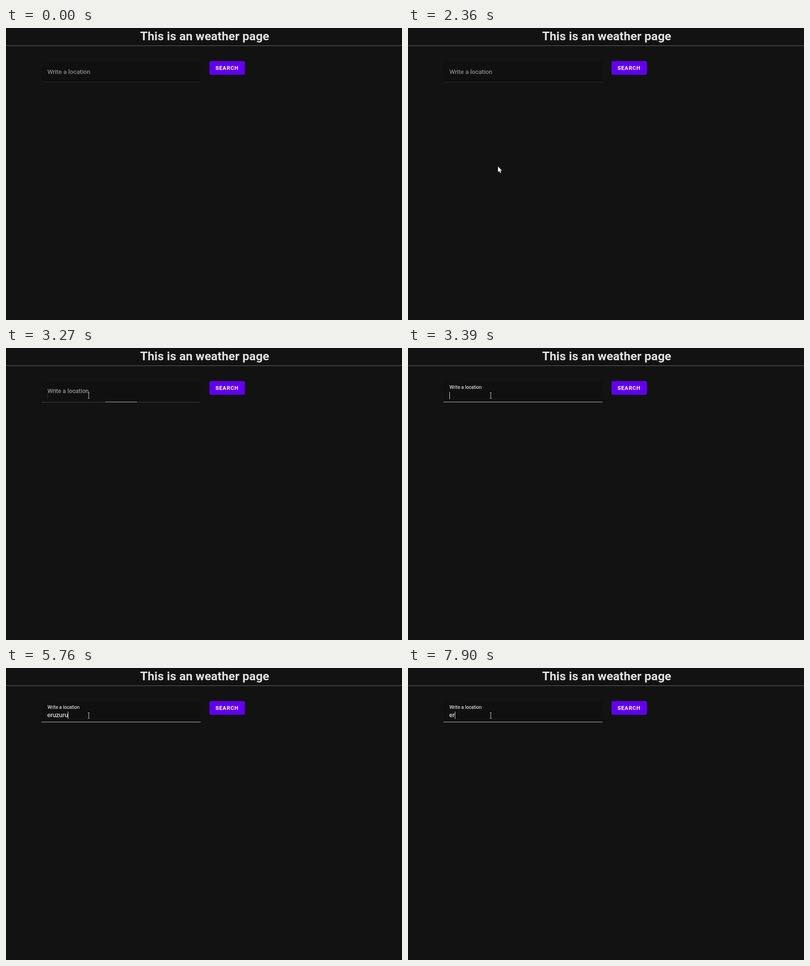
Animation, 871 px wide and 643 px high, one loop 8000 ms. Source, as an HTML page:

```html
<!DOCTYPE html>
<html lang="en">
<head>
<meta charset="utf-8">
<title>Weather page</title>
<style>
  html, body { margin: 0; width: 100%; height: 100%; overflow: hidden; background: #121212; }
  svg { display: block; width: 871px; height: 643px; font-family: Roboto, Arial, sans-serif; }
  .body { font-size: 13.333px; letter-spacing: .00937em; stroke-width: .3; }
  .button { font-size: 11.667px; font-weight: 500; letter-spacing: .0893em; fill: #fff; stroke: #fff; stroke-width: .35; }
  .raised { fill: #6200ee; filter: drop-shadow(0 1.5px 1.5px rgba(0, 0, 0, .35)); }
</style>
</head>
<body>
<svg viewBox="0 0 871 643">
  <rect width="871" height="643" fill="#121212"/>
  <text x="437" y="27" text-anchor="middle" font-size="26.667" font-weight="700" fill="#e0e0e0">This is an weather page</text>
  <rect y="38.2" width="871" height="1.5" fill="#505050"/>

  <path d="M78 119V75.8a3.3 3.3 0 0 1 3.3-3.3H424.7a3.3 3.3 0 0 1 3.3 3.3V119Z" fill="#101010"/>
  <rect id="underline" x="78" y="118.7" width="350" height="1"/>
  <rect id="ripple" y="118" height="1.7" fill="#767676"/>
  <text id="label" class="body">Write a location</text>
  <text id="typed" class="body" x="90.8" y="108.3" fill="#e0e0e0" stroke="#e0e0e0"></text>
  <rect id="caret" width="1" height="16" fill="#e0e0e0"/>

  <rect class="raised" x="447.5" y="73" width="78" height="30" rx="3.3"/>
  <text class="button" x="460.9" y="92.1">SEARCH</text>

  <path id="arrow" d="M0 0V12.4L2.8 9.8 4.7 14 6.7 13.1 4.9 9H8.6Z" fill="#fff"/>
  <path id="beam" d="M180 98.5h1.5l.5 .5 .5-.5H184M182 99V110.5M180 111h1.5l.5-.5 .5 .5H184" fill="none" stroke="#d0d0d0"/>
</svg>
<script>
const LOOP = 8000;
const POINTER_STEP = 70;
const BLINK = 530;
const HOVER = 3190, FOCUS = 3180;
const TYPE = 4040, TYPE_GAP = 172;
const LAST_KEY = 5760;
const ERASE = 6710, ERASE_GAP = 155;
const WORD = 'eruzuru';
const TEXT_X = 90.8;

const el = id => document.getElementById(id);
const set = (id, attrs) => {
  for (const name in attrs) el(id).setAttribute(name, attrs[name]);
};
const clamp = (v, lo, hi) => Math.min(hi, Math.max(lo, v));
const mix = (a, b, p) => a + (b - a) * p;
const gray = v => `rgb(${v},${v},${v})`;

function ease(t, start, length) {
  const p = clamp((t - start) / length, 0, 1);
  return p * p * (3 - 2 * p);
}

// Repeated casteljau mixing gives a point on a curve of any degree.
function curve(points, p) {
  if (points.length === 1) return points[0];
  const inner = points.slice(1).map(([x, y], i) =>
    [mix(points[i][0], x, p), mix(points[i][1], y, p)]);
  return curve(inner, p);
}

const moves = [
  { from: 1300, to: 1500, path: [[464, 596], [24, 529]], span: 140 },
  { from: 2360, to: 2770, path: [[198, 305], [365, 240], [295, 160], [181, 145]], span: 410 },
  { from: 2770, to: 3120, path: [[181, 145], [173, 140], [174, 128], [180, 112]], span: 350 }
];

function pointerAt(t) {
  const move = moves.find(m => t >= m.from && t < m.to);
  if (!move) return null;
  const elapsed = Math.floor((t - move.from) / POINTER_STEP) * POINTER_STEP;
  return curve(move.path, elapsed / move.span);
}

// Number of evenly spaced key presses made by time t.
const presses = (t, start, gap, max) => clamp(Math.floor((t - start) / gap) + 1, 0, max);

function draw(t) {
  const pointer = pointerAt(t);
  set('arrow', {
    visibility: pointer ? 'visible' : 'hidden',
    transform: `translate(${pointer || [0, 0]})`
  });
  set('beam', { visibility: t >= 3120 ? 'visible' : 'hidden' });

  const rise = ease(t, 3235, 150);
  const tone = gray(Math.round(mix(139, 222, rise)));
  set('label', {
    transform: `translate(91.2 ${mix(100.5, 89.8, rise)}) scale(${mix(1, .75, rise)})`,
    fill: tone,
    stroke: tone
  });

  const grow = ease(t, 3228, 150);
  set('underline', { fill: gray(t < HOVER ? 42 : 70) });
  set('ripple', { x: 253 - 175 * grow, width: 350 * grow });

  const burst = presses(t, TYPE, TYPE_GAP, 6);
  const last = t >= LAST_KEY;
  const count = burst + last - presses(t, ERASE, ERASE_GAP, 5);
  el('typed').textContent = WORD.slice(0, count);

  // Typing restarts the blink; erasing leaves it running.
  const blinkStart = last ? LAST_KEY : burst ? TYPE + TYPE_GAP * (burst - 1) : FOCUS;
  const lit = Math.floor((t - blinkStart) / BLINK) % 2 === 0;
  set('caret', {
    x: Math.round(TEXT_X + (count ? el('typed').getComputedTextLength() : 0)),
    y: count ? 96 : 97,
    opacity: lit ? rise : 0
  });
}

const start = performance.now();
function tick() {
  draw((performance.now() - start) % LOOP);
  requestAnimationFrame(tick);
}
tick();
</script>
</body>
</html>
```
